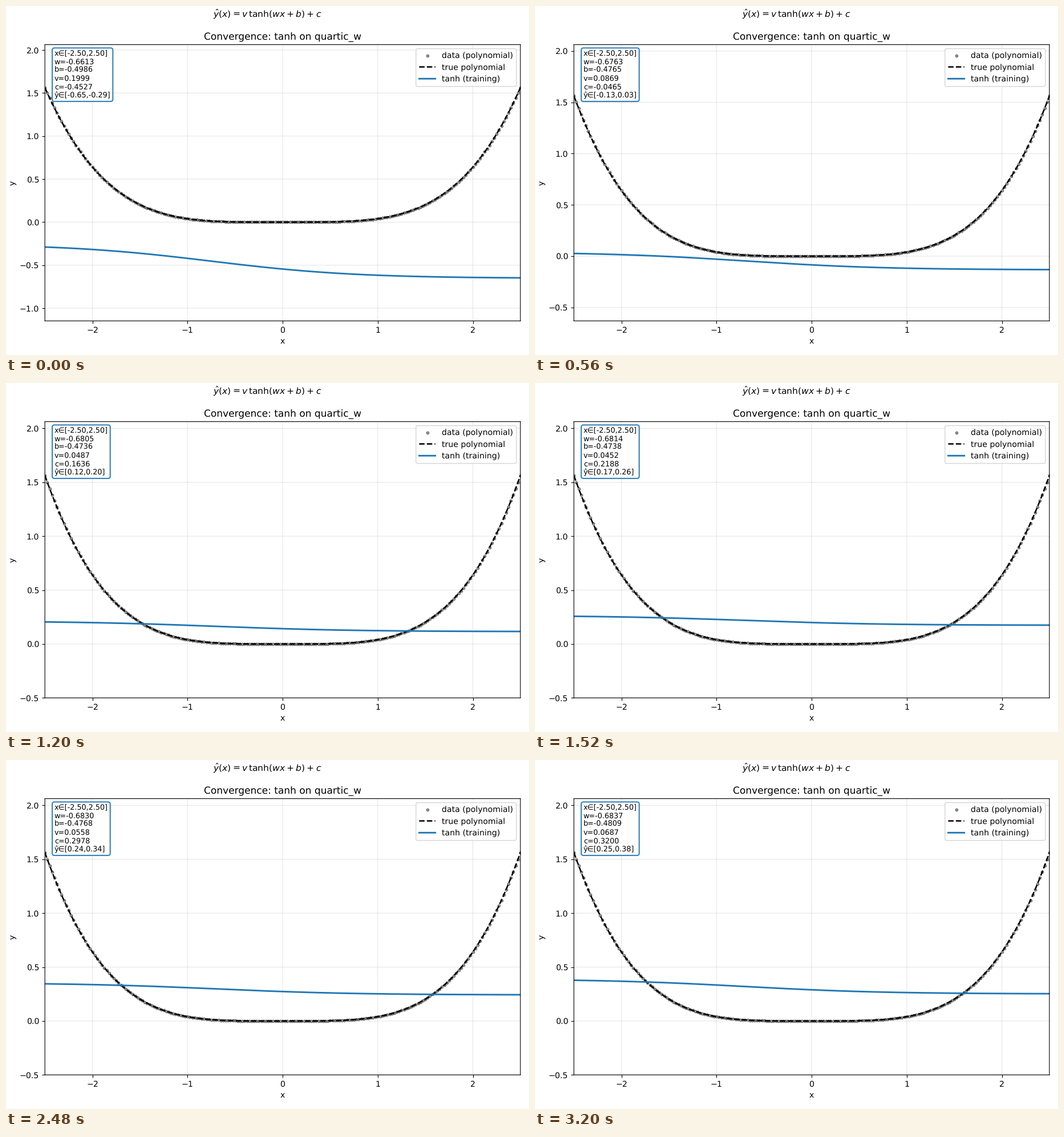
A matplotlib script that plays this animation: 917x611 px, repeating every 3.28 s.

```python
import numpy as np
import matplotlib.pyplot as plt
from matplotlib.animation import FuncAnimation

W, H = 917, 611
DPI = W / 9
FRAMES, INTERVAL = 41, 80
STEPS, RATE = 20, 0.005  # gradient steps per frame, learning rate
START = (-0.6613, -0.4986, 0.1999, -0.4527)  # w, b, v, c
BLUE = "tab:blue"

# Soft, unsnapped lines and unhinted text
plt.rcParams.update({"path.snap": False, "text.hinting": "none"})

x = np.linspace(-2.5, 2.5, 201)
y = 0.04 * x**4


def predict(params):
    w, b, v, c = params
    return v * np.tanh(w * x + b) + c


def descend(params):
    """One gradient step on half the mean squared error."""
    w, b, v, c = params
    t = np.tanh(w * x + b)
    err = v * t + c - y
    back = err * v * (1 - t**2)
    grad = np.array([(back * x).mean(), back.mean(), (err * t).mean(), err.mean()])
    return params - RATE * grad


def train():
    """Parameters for every frame."""
    path = [np.array(START)]
    while len(path) < FRAMES:
        params = path[-1]
        for _ in range(STEPS):
            params = descend(params)
        path.append(params)
    return path


path = train()

# The tiny margin guards against truncation to one pixel less
fig = plt.figure(figsize=((W + 1e-3) / DPI, (H + 1e-3) / DPI), dpi=DPI)
left, right, top, bottom = 68.2, 901.9, 67.6, 551.3
ax = fig.add_axes([left / W, 1 - bottom / H, (right - left) / W, (bottom - top) / H])

fig.suptitle(r"$\hat{y}(x) = v\,\tanh(wx+b)+c$", fontsize=11, y=0.995)
ax.set_title("Convergence: tanh on quartic_w")
ax.set_xlabel("x")
ax.set_ylabel("y")
ax.set_xlim(x[0], x[-1])
ax.grid(True, alpha=0.3)

ax.scatter(x, y, s=10, color="black", alpha=0.4, label="data (polynomial)")
ax.plot(x, y, "k--", lw=1.8, label="true polynomial")
(fit,) = ax.plot(x, predict(path[0]), color=BLUE, lw=2, label="tanh (training)")
ax.legend(loc="upper right")

info = ax.text(
    0.02, 0.98, "", transform=ax.transAxes, fontsize=9, va="top", ha="left",
    bbox=dict(boxstyle="round", facecolor="white", edgecolor=BLUE, lw=1.5, alpha=0.9),
)


def update(i):
    w, b, v, c = path[i]
    pred = predict(path[i])
    lo, hi = pred.min(), pred.max()
    fit.set_ydata(pred)
    ax.set_ylim(min(y.min(), lo) - 0.5, max(y.max(), hi) + 0.5)
    info.set_text(
        f"x∈[{x[0]:.2f},{x[-1]:.2f}]\n"
        f"w={w:.4f}\nb={b:.4f}\nv={v:.4f}\nc={c:.4f}\n"
        f"ŷ∈[{lo:.2f},{hi:.2f}]"
    )
    return fit, info


anim = FuncAnimation(fig, update, frames=FRAMES, interval=INTERVAL,
                     repeat=True, repeat_delay=0, blit=False)
plt.show()
```
